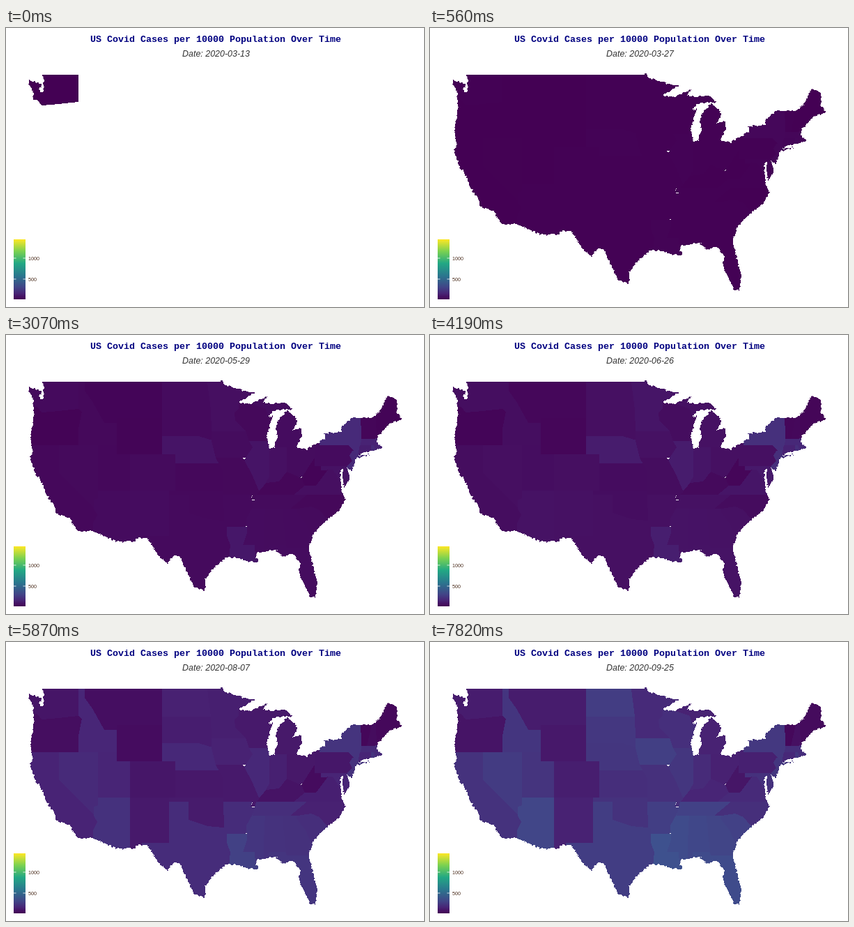
Animation, 600 px wide and 400 px high, one loop 8 s. Source, as an HTML page:

```html
<!DOCTYPE html>
<html lang="en">
<head>
<meta charset="utf-8">
<style>
html, body { margin: 0; height: 100%; overflow: hidden; background: #fff; }
svg { display: block; }
.title { font: bold 13.333px "Liberation Mono", monospace; fill: navy; text-anchor: middle; }
.date { font: italic 12.45px "Liberation Sans", sans-serif; fill: #333; text-anchor: middle; }
.label { font: 7.2px "Liberation Sans", sans-serif; fill: #4d3020; }
</style>
</head>
<body>
<svg width="600" height="400">
<defs>
  <linearGradient id="scale" gradientTransform="rotate(90)"></linearGradient>
  <filter id="rough" color-interpolation-filters="sRGB">
    <feTurbulence type="fractalNoise" baseFrequency=".3"/>
    <feDisplacementMap in="SourceGraphic" scale="5" xChannelSelector="R" yChannelSelector="G"/>
  </filter>
</defs>

<!-- Later states cover the loose edges of earlier ones; water trims the coast.
     class: shape of growth, data-n: final cases, data-from: first showing -->
<g id="states" shape-rendering="crispEdges">
  <path id="OR" class="summer" data-n="76" d="M20 90H110V160H20z"/>
  <path id="WA" class="steady" data-n="110" data-from="start" d="M20 60H104V106L65 110 51 111 45 103H20z"/>
  <path id="CA" class="summer" data-n="204" d="M20 158H80V197L140 260V300H20z"/>
  <path id="ID" class="summer" data-n="222" d="M104 60H165V158H104V134L109 110 104 106z"/>
  <path id="MT" class="late" data-n="108" d="M113 60H224V126H141L125 97 113 80z"/>
  <path id="NV" class="summer" data-n="250" data-from="next" d="M76 158H132V234L126 236V248L76 197z"/>
  <path id="UT" class="summer" data-n="215" d="M132 158H180V223H132z"/>
  <path id="WY" class="late" data-n="92" d="M159 119H224V171H159z"/>
  <path id="AZ" class="summer" data-n="298" d="M132 223H178V300H125V270L131 258 126 249V236L132 234z"/>
  <path id="NM" class="steady" data-n="134" d="M178 223H236V300H178z"/>
  <path id="ND" class="late" data-n="255" d="M224 60H300V107H224z"/>
  <path id="SD" class="late" data-n="228" d="M224 107H300V150H224z"/>
  <path id="NE" class="steady" data-n="223" d="M224 145H276L300 152 310 184H243V171H224z"/>
  <path id="KS" class="late" data-n="188" d="M243 184H316V223H243z"/>
  <path id="CO" class="steady" data-n="117" data-from="next" d="M178 171H243V223H178z"/>
  <path id="OK" class="late" data-n="207" d="M234 223H316V270H234z"/>
  <path id="TX" class="summer" data-n="259" d="M234 229H262V255L290 264 322 267V330L290 385H195V288H234z"/>
  <path id="MN" class="steady" data-n="167" d="M288 60H365V138H295L294 107z"/>
  <path id="WI" class="late" data-n="194" d="M334 97L365 80 390 90V155H344V138L329 122 328 112 334 105z"/>
  <path id="IA" class="late" data-n="266" d="M295 138H344L349 152H360V176H301L295 152z"/>
  <path id="MO" class="late" data-n="196" d="M301 176H340L372 222 357 236H351L354 230H312V196z"/>
  <path id="AR" class="summer" data-n="262" d="M312 229H354L351 236 370 240 344 275H317V268L313 266z"/>
  <path id="LA" class="gulf" data-n="352" data-from="next" d="M317 275H370V340H318L322 301 317 288z"/>
  <path id="MS" class="summer" data-n="322" d="M375 240V318H358L357 301H340L346 284 345 263 358 240z"/>
  <path id="AL" class="summer" data-n="306" d="M372 245H405V318H370V288z"/>
  <path id="GA" class="summer" data-n="293" d="M396 245H440L450 290 434 307H403L400 283z"/>
  <path id="FL" class="summer" data-n="323" d="M377 301H401L403 306H460V390H420L377 325z"/>
  <path id="SC" class="summer" data-n="278" d="M419 245L417 253 430 270 438 288 475 280V240z"/>
  <path id="NC" class="summer" data-n="190" d="M400 225H500V264H461L450 251 438 246 419 249H396z"/>
  <path id="TN" class="summer" data-n="278" d="M359 229H432L408 249H354z"/>
  <path id="IL" class="steady" data-n="224" d="M349 152H378V210L363 223 354 202 342 179 354 161z"/>
  <path id="IN" class="steady" data-n="172" d="M378 155H403V212H373L378 203z"/>
  <path id="OH" class="steady" data-n="127" d="M403 155H450V200L413 205 403 196z"/>
  <path id="MI" class="steady" data-n="133" data-from="next" d="M352 99L365 80H430V150L416 161H384V110L377 118 373 106z"/>
  <path id="KY" class="late" data-n="145" d="M360 229L373 212 392 210 403 196 424 205 432 218 413 229z"/>
  <path id="VA" class="steady" data-n="169" d="M413 229L429 216 460 190H500V229z"/>
  <path id="WV" class="late" data-n="83" d="M424 205L443 176 452 188V194L463 192 445 216 429 216z"/>
  <path id="MD" class="steady" data-n="202" d="M452 180H500V213H482L469 193 452 194z"/>
  <path id="DE" class="steady" data-n="206" d="M487 180H500V204H487z"/>
  <path id="PA" class="steady" data-n="123" d="M443 150H505V188H443z"/>
  <path id="NJ" class="early" data-n="226" data-from="next" d="M497 166H510V200H492L489 188 497 181 493 173z"/>
  <path id="NY" class="early" data-n="233" data-from="next" d="M450 158V110H530V180H503L504 171 491 158z"/>
  <path id="VT" class="early" data-n="28" d="M509 110H530V149H510z"/>
  <path id="NH" class="steady" data-n="59" d="M527 110H540V149H518L522 132z"/>
  <path id="ME" class="steady" data-n="39" d="M529 80H585V150L532 145z"/>
  <path id="MA" class="early" data-n="188" data-from="next" d="M510 149H528L545 145V170H508z"/>
  <path id="CT" class="early" data-n="159" data-from="next" d="M508 158H524V169L505 172z"/>
  <path id="RI" class="early" data-n="230" d="M524 158H528L531 168H524z"/>
</g>

<g fill="#fff" shape-rendering="crispEdges">
  <path d="M0 45H308V67H0z"/>
  <g filter="url(#rough)">
    <path id="pacific" d="M0 45H52V68L55 74 53 81 55 90 50 92 48 88 51 82 49 79 33 75V80L39 91 40 115 35 147 38 165 35 179 42 198 53 213 58 229 71 248V255L91 262 103 281H125L159 296H186V291H203L220 318 232 327 241 316 249 317 270 361 288 367V400H0z"/>
    <path id="gulf" d="M286 367V350L299 333 318 318 334 320 347 325 363 326 358 319 361 312 387 308 398 318 412 313 422 326 421 343 437 377V400H286z"/>
    <path id="atlantic" d="M437 400V376H444L447 355 434 305 442 284 461 264 476 254 487 236 481 223 480 194 484 191 483 203 485 220 494 204 489 190 496 195 503 177 523 171H600V400z"/>
    <path id="sound" d="M600 171H523L505 173 514 168 530 165 541 162 532 154 534 144 552 127 568 121H600z"/>
    <path id="canada" d="M600 122H568L561 110V93L548 87 538 107 527 119H497L482 131V139L457 141 458 148 432 164 416 161 425 145 424 134 412 136 417 128V119L404 109V107H411V45H600z"/>
    <path id="michigan" d="M404 109L391 121 387 133 390 145 385 161 378 163 374 144 383 115 377 118 382 109 404 106z"/>
    <path id="superior" d="M411 107L401 97 381 99 369 97 376 87 352 98 334 97 358 82 341 80 313 71 308 63V45H411z"/>
  </g>
</g>

<text class="title" x="301" y="19.5">US Covid Cases per 10000 Population Over Time</text>
<text class="date" id="date" x="301.5" y="41"></text>

<rect x="11" y="303" width="17" height="86" fill="url(#scale)"/>
<path d="M11 330h3.5m10 0h3.500M11 360h3.500m10 0h3.500" stroke="#fff" stroke-width=".8"/>
<text class="label" x="32" y="332.8">1000</text>
<text class="label" x="32" y="362.8">500</text>
</svg>

<script>
const LOOP = 8000, STEP = 280, MAX = 1450;
const $ = id => document.getElementById(id);
const scale = ['#fde725', '#7ad151', '#22a884', '#2a788e', '#414487', '#482576', '#440154'];
const [, , , , mid, low, zero] = scale;
const weeks = [1, 7, 15, 21, 28];
const growth = {
  early: [0, .62, .84, .92, 1],
  steady: [0, .2, .48, .72, 1],
  summer: [0, .05, .23, .68, 1],
  late: [0, .08, .24, .5, 1],
  gulf: [0, .18, .33, .78, 1]
};
const firstWeek = { start: 0, next: 1 };
const states = [...document.querySelectorAll('#states path')];
let shown = -1;

$('scale').innerHTML = scale.map((c, i) =>
  `<stop offset="${i < 5 ? i / 5 : i * .1 + .4}" stop-color="${c}"/>`).join('');

function share(curve, week) {
  if (week <= weeks[0]) return 0;
  const i = weeks.findIndex(w => week <= w);
  const f = (week - weeks[i - 1]) / (weeks[i] - weeks[i - 1]);
  return curve[i - 1] + (curve[i] - curve[i - 1]) * f;
}

function colour(cases) {
  const p = cases / MAX * 10;
  const [a, b, f] = p < 1 ? [zero, low, p] : [low, mid, p - 1];
  const part = (c, k) => parseInt(c.slice(1 + 2 * k, 3 + 2 * k), 16);
  // beyond the second stop the mix simply runs on
  return `rgb(${[0, 1, 2].map(k => Math.round(part(a, k) + (part(b, k) - part(a, k)) * f))})`;
}

function show(week) {
  $('date').textContent = 'Date: ' + new Date(Date.UTC(2020, 2, 13 + 7 * week)).toISOString().slice(0, 10);
  for (const s of states) {
    const from = firstWeek[s.dataset.from] ?? 2;
    s.style.fill = week < from ? '#fff' : colour(s.dataset.n * share(growth[s.className.baseVal], week));
  }
}

function tick() {
  const t = performance.now() % LOOP;
  const lead = t < 2500 ? 0 : t < 7500 ? 10 : 20;
  const week = Math.floor((t + lead) / STEP);
  if (week !== shown) show(shown = week);
  requestAnimationFrame(tick);
}
tick();
</script>
</body>
</html>
```
